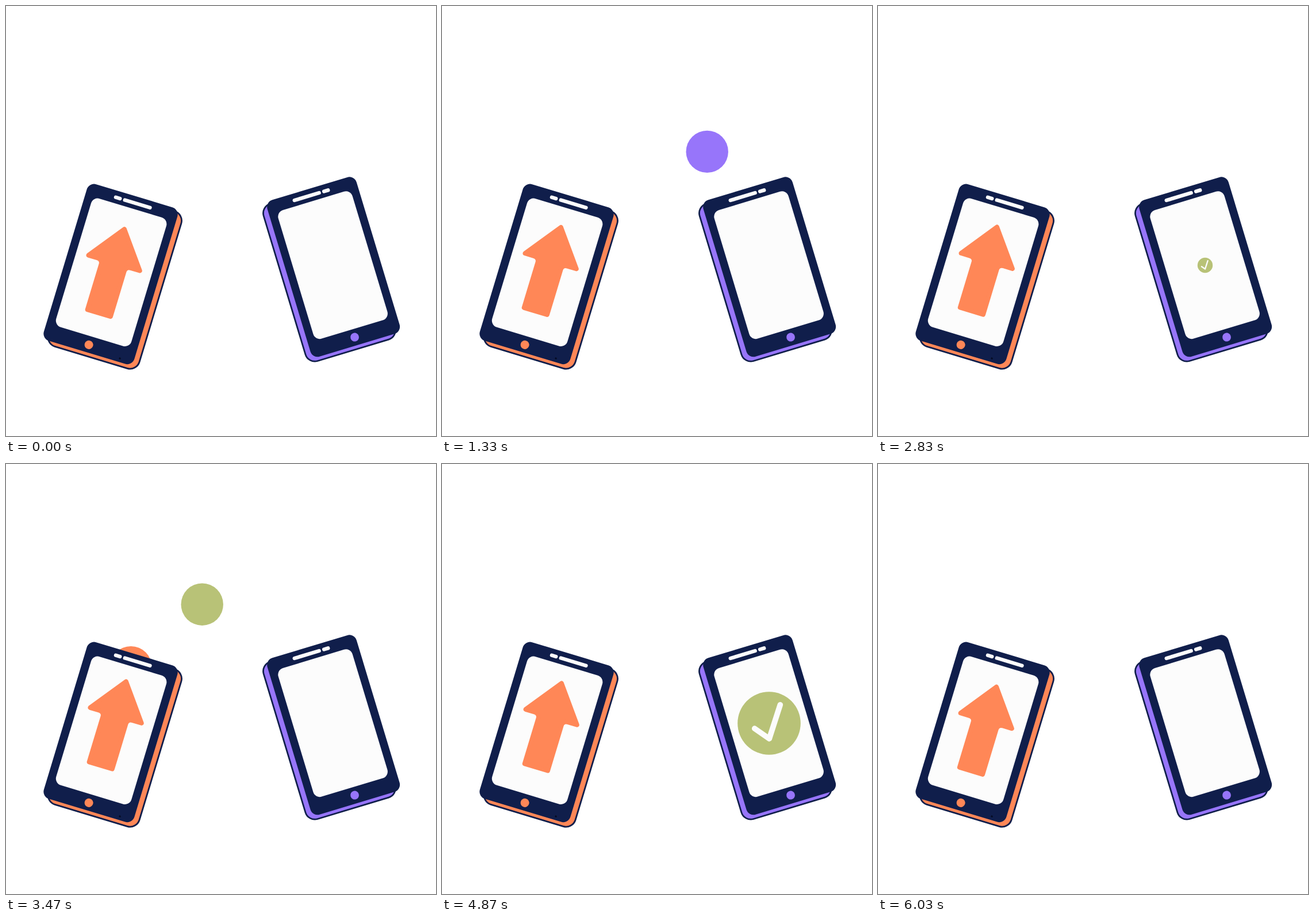
An HTML page that plays this animation: 748 px wide and 748 px high, repeating every 6.06 s.

```html
<!DOCTYPE html>
<html lang="en">
<head>
<meta charset="utf-8">
<title>Phone transfer</title>
<style>
  html, body { margin: 0; width: 100%; height: 100%; overflow: hidden; background: #fff; }
  svg { display: block; width: 100%; height: 100%; }
  .navy { fill: #101e4b; }
  .screen { fill: #fcfcfc; }
  .orange { fill: #ff8757; }
  .purple { fill: #9775fa; }
  .green { fill: #b8c277; }
  .back { stroke: #101e4b; stroke-width: 2.8; }
  .arrow { stroke: #ff8757; stroke-width: 8; stroke-linejoin: round; }
  .tick { fill: none; stroke: #fcfcfc; stroke-width: 9; stroke-linecap: round; stroke-linejoin: round; }
</style>
</head>
<body>
<svg viewBox="0 0 748 748">
  <defs>
    <g id="front">
      <rect class="navy" width="164.5" height="284.5" rx="13"/>
      <rect class="screen" x="14" y="22.2" width="136.8" height="233.6" rx="12"/>
      <rect class="screen" x="49" y="8.6" width="14" height="6.4" rx="3.2"/>
      <rect class="screen" x="65.5" y="8.6" width="52" height="6.4" rx="3.2"/>
    </g>
    <rect id="back" x="9" y="5.5" width="165.3" height="285.4" rx="17"/>
    <path id="route" d="M200 410 L217 355 C230 295 290 240 385 240 C430 240 470 252 508 278 C545 303 565 340 570 390"/>
  </defs>

  <circle class="ball green" r="36.7"/>
  <circle class="ball orange" r="36.7"/>
  <circle class="ball purple" r="36.7"/>

  <g transform="translate(144.4 306.4) rotate(16.8)">
    <use href="#back" class="back orange"/>
    <use href="#front"/>
    <circle class="orange" cx="81.5" cy="271" r="7.5"/>
    <circle cx="140" cy="278" r="1.6" fill="#050a20"/>
    <path id="arrow" class="arrow orange" d="M82.5 60.5 L129.1 122 H113 Q103.5 122 103.5 131 V213 H61.5 V131 Q61.5 122 52 122 H35.9 Z"/>
  </g>

  <g transform="translate(606.1 294.2) rotate(-16.8) scale(-0.985 1)">
    <use href="#back" class="back purple"/>
    <use href="#front"/>
    <circle class="purple" cx="82.3" cy="270" r="7.5"/>
  </g>

  <g id="check">
    <circle class="green" r="51"/>
    <path class="tick" d="M-23.5 8.5 L0.3 25 L18 -30"/>
  </g>
</svg>
<script>
  const LOOP = 3030, BOB = LOOP / 2, LIFT = 17;
  const BALL_GAP = 330, SPEED = 0.53;
  // time in ms, scale of the check mark
  const POP = [[1640, 0], [1830, 1.075], [2000, 1], [2600, 1], [2950, 0]];

  const route = document.getElementById('route');
  const arrow = document.getElementById('arrow');
  const check = document.getElementById('check');
  const balls = document.querySelectorAll('.ball');
  const length = route.getTotalLength();

  const smooth = p => (1 - Math.cos(Math.PI * p)) / 2;

  function keyed(keys, t) {
    const i = keys.findIndex(k => k[0] > t);
    if (i < 1) return 0;
    const [t0, a] = keys[i - 1], [t1, b] = keys[i];
    return a + (b - a) * smooth((t - t0) / (t1 - t0));
  }

  function lift(t) {
    const p = 1 - Math.abs(1 - 2 * (t % BOB) / BOB);
    return LIFT * (0.6 * p + 0.4 * smooth(p));
  }

  function draw(now) {
    const t = now % LOOP;
    arrow.setAttribute('transform', `translate(0 ${-lift(t)})`);

    balls.forEach((ball, i) => {
      const s = (t - i * BALL_GAP) * SPEED;
      const flying = s >= 0 && s <= length;
      ball.style.display = flying ? '' : 'none';
      if (!flying) return;
      const { x, y } = route.getPointAtLength(s);
      ball.setAttribute('cx', x);
      ball.setAttribute('cy', y);
    });

    const scale = keyed(POP, t);
    check.style.display = scale > 0 ? '' : 'none';
    check.setAttribute('transform', `translate(569 451) scale(${scale})`);
  }

  const start = performance.now();
  function tick() {
    draw(performance.now() - start);
    requestAnimationFrame(tick);
  }
  tick();
</script>
</body>
</html>
```
